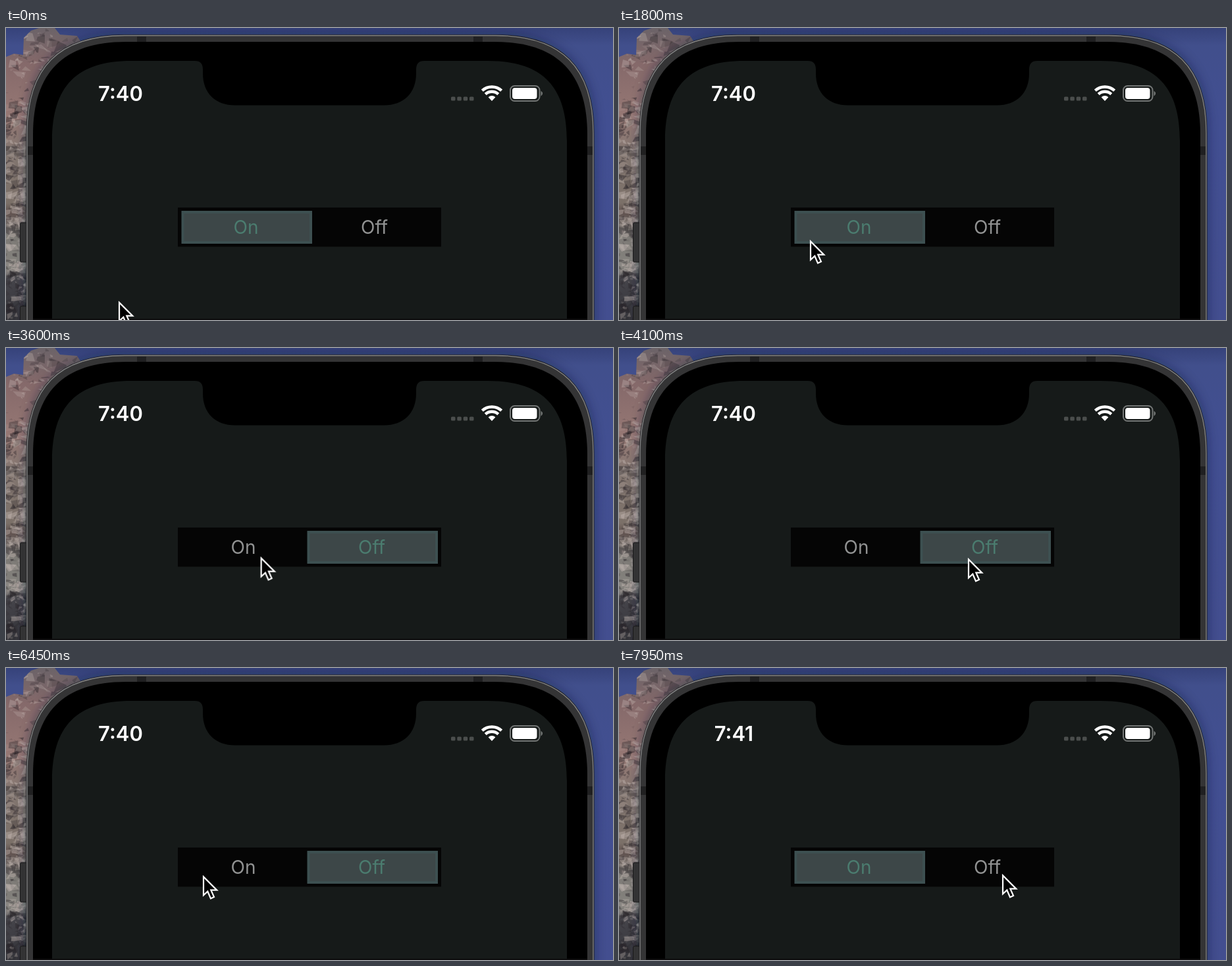
An HTML page that plays this animation: 922x444 px, repeating every 8 s.

```html
<!DOCTYPE html>
<html lang="en">
<head>
<meta charset="utf-8">
<title>Segmented switch</title>
<style>
html, body { margin: 0; width: 100%; height: 100%; overflow: hidden; background: #3f4c8c; }
svg { display: block; width: 922px; height: 444px; }
text { font-family: Inter, Roboto, sans-serif; text-anchor: middle; }
.clock { font-size: 31px; font-weight: 600; fill: #fff; }
.label { font-size: 28px; }

.pill, .on, .off, .before, .after { animation: 8s step-end infinite; }
.pill { animation-name: pill; }
.on { animation-name: on; }
.off { animation-name: off; }
.before { animation-name: before; }
.after { animation-name: after; }
.cursor { animation: cursor 8s linear infinite; }

@keyframes pill {
  0%, 60%, 86.25% { transform: none; }
  28.125%, 74.375% { transform: translateX(191px); }
}
@keyframes on {
  0%, 60%, 86.25% { fill: #4b7c6f; transform: none; }
  28.125%, 74.375% { fill: #919292; transform: translateX(-4px); }
}
@keyframes off {
  0%, 60%, 86.25% { fill: #919292; transform: none; }
  28.125%, 74.375% { fill: #4b7c6f; transform: translateX(-4px); }
}
@keyframes before { 0% { opacity: 1; } 93.75% { opacity: 0; } }
@keyframes after { 0% { opacity: 0; } 93.75% { opacity: 1; } }

@keyframes cursor {
  0% { transform: translate(171px, 416px); }
  4.375%, 10.625% { transform: translate(176px, 405px); }
  20.625% { transform: translate(284px, 334px); }
  22.5% { transform: translate(290px, 323px); }
  25.625%, 43.125% { transform: translate(290px, 318px); }
  43.75% { transform: translate(318px, 318px); }
  45% { transform: translate(386px, 318px); }
  46.25% { transform: translate(446px, 323px); }
  47.5% { transform: translate(492px, 326px); }
  48.75% { transform: translate(516px, 324px); }
  51.25%, 55% { transform: translate(530px, 320px); }
  57.5%, 61.875% { transform: translate(526px, 320px); }
  66.25% { transform: translate(391px, 332px); }
  68.75% { transform: translate(336px, 326px); }
  72.5%, 88.125% { transform: translate(299px, 316px); }
  91.25% { transform: translate(330px, 316px); }
  98.75% { transform: translate(566px, 313.5px); }
  99.375%, 100% { transform: translate(582px, 314px); }
}
</style>
</head>
<body>
<svg viewBox="0 0 922 444">
  <defs>
    <linearGradient id="sky" x2="0" y2="1">
      <stop offset="0" stop-color="#36427a"/>
      <stop offset=".06" stop-color="#414f8c"/>
      <stop offset=".35" stop-color="#424f92"/>
      <stop offset="1" stop-color="#434e8f"/>
    </linearGradient>
    <linearGradient id="stone" x2="0" y2="1">
      <stop offset="0" stop-color="#6b6368"/>
      <stop offset=".12" stop-color="#85696a"/>
      <stop offset=".3" stop-color="#967874"/>
      <stop offset=".42" stop-color="#857872"/>
      <stop offset=".6" stop-color="#7b7068"/>
      <stop offset=".63" stop-color="#5f504d"/>
      <stop offset=".7" stop-color="#7d7a76"/>
      <stop offset=".82" stop-color="#84827d"/>
      <stop offset=".86" stop-color="#45444a"/>
      <stop offset="1" stop-color="#35353b"/>
    </linearGradient>
    <clipPath id="cliff">
      <path d="M0 44 L12 39 L26 41 L27 15 L38 4 L50 0 H74 L82 10 L108 12 L117 26 L60 120 L36 200 V444 H0Z"/>
    </clipPath>
    <filter id="soft" x="-10%" y="-10%" width="120%" height="120%"><feGaussianBlur stdDeviation="9"/></filter>
    <path id="body" d="M32 460 V160 C32 60 80 11.500 180 11.500 H744 C844 11.500 892 60 892 160 V460Z"/>
  </defs>

  <rect width="922" height="444" fill="url(#sky)"/>
  <g clip-path="url(#cliff)">
    <rect width="120" height="444" fill="url(#stone)"/>
    <g id="facets"></g>
  </g>
  <use href="#body" fill="#101530" opacity=".55" filter="url(#soft)"/>

  <g fill="#333334" stroke="#191919">
    <rect x="21.5" y="296" width="14" height="60" rx="2"/>
    <rect x="21.5" y="423" width="14" height="40" rx="2"/>
  </g>
  <use href="#body" fill="#343435" stroke="#1c1c1d" stroke-width="3"/>
  <use href="#body" fill="#343435" stroke="#858586" stroke-width="1.3"/>
  <path d="M199 13 h14 v9 h-14z M710 13 h14 v9 h-14z M33 180 h9 v13 h-9z M882 180 h9 v13 h-9z" fill="#202021"/>
  <path d="M41 460 V162 C41 68 87 21 182 21 H742 C837 21 883 68 883 162 V460Z"/>
  <path fill="#161a19" d="M70 444 V172 C70 88 108 50 190 50 H287 Q299 50 299 63 V69 C299 99 318 117.500 348 117.500 H574 C604 117.500 623 99 623 69 V63 Q623 50 635 50 H732 C814 50 852 88 852 172 V444Z"/>
  <rect x="41" y="442" width="842" height="2" fill="#0d0c0d"/>

  <text class="clock before" x="174" y="111">7:40</text>
  <text class="clock after" x="174.500" y="111">7:41</text>

  <g fill="#4b4e4d">
    <rect x="676" y="104.500" width="6.500" height="6" rx="1.500"/>
    <rect x="685.300" y="104.500" width="6.500" height="6" rx="1.500"/>
    <rect x="694.700" y="104.500" width="6.500" height="6" rx="1.500"/>
    <rect x="704" y="104.500" width="6.500" height="6" rx="1.500"/>
  </g>
  <g fill="none" stroke="#fff" stroke-width="4.400">
    <path d="M723.300 95.200 A21.600 21.600 0 0 1 752.700 95.200"/>
    <path d="M728.250 100.550 A14.300 14.300 0 0 1 747.750 100.550"/>
  </g>
  <path d="M738 111 L732.600 105.200 A8 8 0 0 1 743.400 105.200Z" fill="#fff"/>
  <rect x="766" y="88" width="44.500" height="23" rx="6.500" fill="none" stroke="#737675" stroke-width="2"/>
  <rect x="769" y="91" width="37.500" height="17" rx="4" fill="#fff"/>
  <path d="M812.500 95.500 Q817.500 99.500 812.500 103.500Z" fill="#737675"/>

  <rect x="261" y="273" width="400" height="59.500" fill="#050505"/>
  <rect class="pill" x="268.500" y="280" width="194.500" height="46" fill="#3d4748" stroke="#3d5051" stroke-width="4"/>
  <text class="label on" x="364.500" y="312.700">On</text>
  <text class="label off" x="559.500" y="312.700">Off</text>

  <g class="cursor">
    <path d="M1 1.500 V29.500 L7.300 23.700 L12 34.500 L17 32.300 L12.300 21.700 H21.200Z" stroke="#fff" stroke-width="2.200"/>
  </g>
</svg>
<script>
// Scatter light and dark facets over the cliff
let seed = 7;
const rand = () => (seed = (seed * 16807) % 2147483647) / 2147483647;
const near = (v, d) => (v + (rand() - .5) * d).toFixed(1);

let facets = '';
for (let i = 0; i < 480; i++) {
  const y = rand() * 444;
  const x = rand() * (y < 110 ? 115 : 40);
  const size = 3 + rand() * 9;
  const corners = [[-1, -1], [1, -1], [1, 1], [-1, 1]]
    .map(([a, b]) => near(x + a * size / 2, size) + ',' + near(y + b * size / 3, size));
  const tone = rand() < .5 ? '#241f24' : '#c8bcb6';
  facets += `<polygon points="${corners.join(' ')}" fill="${tone}" opacity="${(.1 + rand() * .35).toFixed(2)}"/>`;
}
document.getElementById('facets').innerHTML = facets;
</script>
</body>
</html>
```
